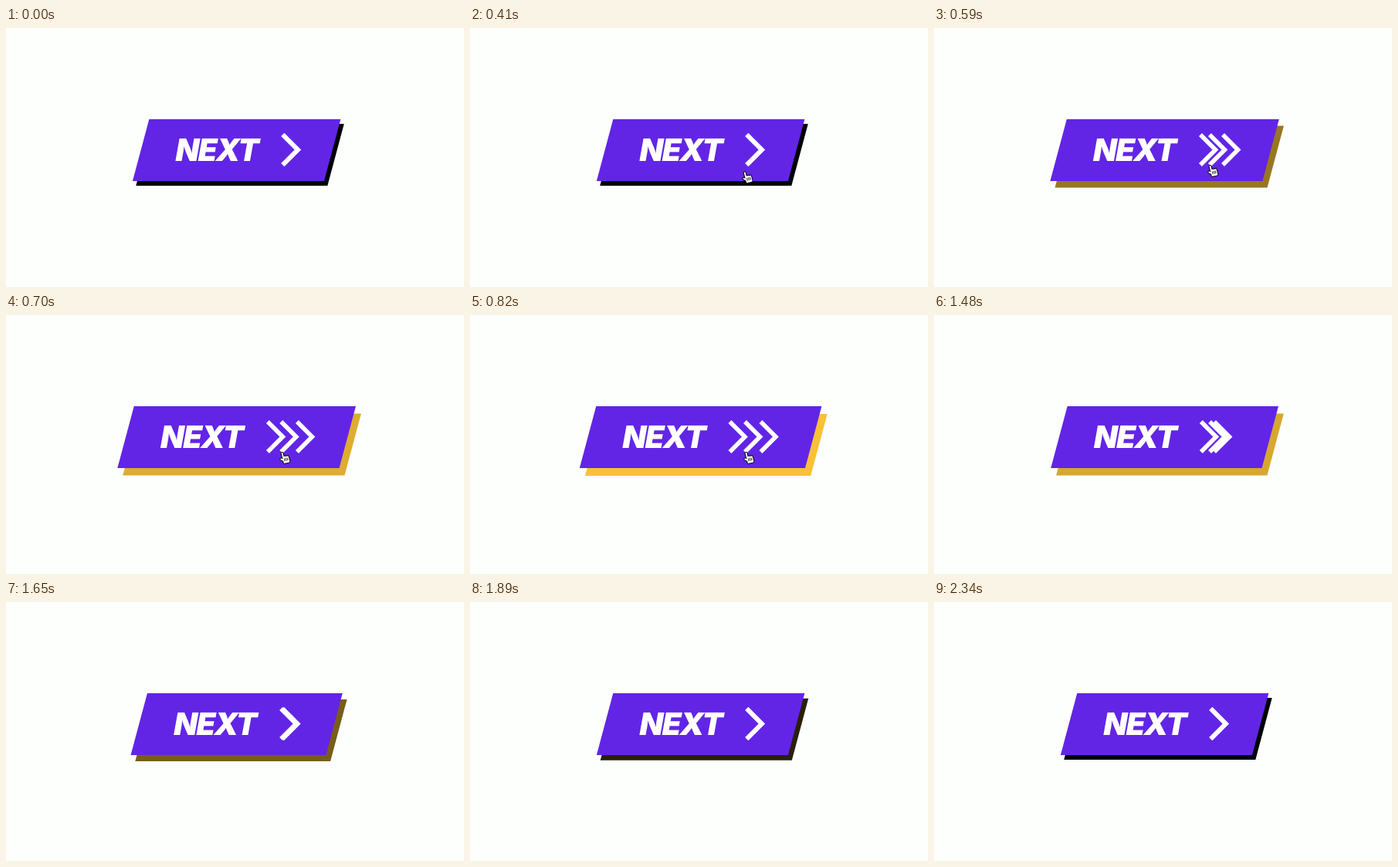
An HTML page with a canvas that plays this animation: 593 px wide and 335 px high, repeating every 2400 ms.

```html
<!DOCTYPE html>
<html lang="en">
<head>
<meta charset="utf-8">
<title>Next button</title>
<style>
html, body { margin: 0; width: 100%; height: 100%; overflow: hidden; background: #fdfffc; }
canvas { display: block; }
</style>
</head>
<body>
<canvas id="stage" width="593" height="335"></canvas>
<script>
const ctx = document.getElementById('stage').getContext('2d');
const LOOP = 2400, FIRST_TICK = 290, TICK = 58.4;
const ENTER = 409, LEAVE = 1326;
const POINTER_IN = 290, POINTER_AWAY = 1165, POINTER_OUT = 1440;
const SKEW = Math.tan(15 * Math.PI / 180), ITALIC = 0.18;
const YELLOW = [254, 197, 56];
const CENTER_X = 298.6, TOP = 118, HEIGHT = 80;

const clamp = x => Math.min(1, Math.max(0, x));

// The CSS "ease" curve, solved by bisection
function ease(x) {
  if (x <= 0 || x >= 1) return clamp(x);
  const bezier = (u, a, b) => 3 * u * (1 - u) * ((1 - u) * a + u * b) + u ** 3;
  let low = 0, high = 1;
  for (let i = 0; i < 24; i++) {
    const mid = (low + high) / 2;
    if (bezier(mid, .25, .25) < x) low = mid; else high = mid;
  }
  return bezier(low, .1, 1);
}

function hover(t, inMs, outMs = inMs) {
  return t < LEAVE ? ease((t - ENTER) / inMs) : 1 - ease((t - LEAVE) / outMs);
}

function hold(t) {
  return t < FIRST_TICK ? 0 : FIRST_TICK + Math.floor((t - FIRST_TICK) / TICK) * TICK;
}

function slab(width, offset, color) {
  ctx.save();
  ctx.translate(CENTER_X + offset, TOP + HEIGHT / 2 + offset);
  ctx.transform(1, 0, -SKEW, 1, 0, 0);
  ctx.translate(-offset * 0, 0);
  ctx.fillStyle = color;
  ctx.fillRect(-width / 2 - offset * SKEW, -HEIGHT / 2, width, HEIGHT);
  ctx.restore();
}

function label(x, y) {
  ctx.save();
  ctx.transform(1, 0, -ITALIC, 1, x, y);
  ctx.font = '900 40px Inter, sans-serif';
  ctx.letterSpacing = '-1.5px';
  ctx.fillStyle = '#fff';
  ctx.fillText('NEXT', 0, 0);
  ctx.restore();
}

function line(x1, y1, x2, y2) {
  ctx.moveTo(x1, y1);
  ctx.lineTo(x2, y2);
}

function chevron(x, y) {
  const reach = 19.5;
  ctx.beginPath();
  line(x - reach, y - reach, x, y);
  ctx.lineTo(x - reach, y + reach);
  ctx.lineWidth = 5.6;
  ctx.lineCap = 'butt';
  ctx.lineJoin = 'miter';
  ctx.strokeStyle = '#fff';
  ctx.stroke();
}

function outline(color, width) {
  ctx.strokeStyle = color;
  ctx.lineWidth = width;
  ctx.stroke();
}

function arrow() {
  ctx.beginPath();
  line(0, 0, 0, 15);
  ctx.lineTo(11, 11);
  ctx.closePath();
  line(4, 10, 7, 16);
  outline('#fff', 3);
  outline('#000', 1.5);
  ctx.fill();
}

function hand() {
  ctx.rotate(-.25);
  ctx.translate(0, 1.9);
  ctx.beginPath();
  line(0, 0, 0, 9);
  line(-3, 7, 0, 10);
  for (const x of [2, 4, 6]) line(x, 5 + x / 6, x, 10);
  ctx.rect(0, 8, 6, 4.5);
  outline('#000', 3.8);
  ctx.fillStyle = '#fff';
  ctx.fill();
  outline('#fff', 1.9);
  ctx.beginPath();
  for (const x of [1, 3, 5]) line(x, 7.5, x, 10.5);
  outline('#000', .8);
}

function pointer(t) {
  if (t < POINTER_IN || t >= POINTER_OUT) return;
  const remaining = 1 - clamp((t - POINTER_IN) / 180);
  const away = clamp((t - POINTER_AWAY) / 235);
  const y = 177 + 68 * remaining ** 2 + 82 * away ** 2.2;
  ctx.save();
  ctx.translate(357 - 5 * remaining + 3 * away, y);
  ctx.lineCap = ctx.lineJoin = 'round';
  ctx.fillStyle = '#000';
  if (y > TOP + HEIGHT) arrow(); else hand();
  ctx.restore();
}

function draw(t) {
  const open = hover(t, 500);
  const glow = hover(t, 500, 1000);
  const slide = 22.5 * open;
  const width = 248 + 45 * open;

  ctx.fillStyle = '#fdfffc';
  ctx.fillRect(0, 0, 593, 335);
  slab(width, 6 + 4 * glow, `rgb(${YELLOW.map(c => Math.round(c * glow))})`);
  slab(width, 0, '#6225e6');
  label(217.5 - slide, 172);
  for (const offset of [0, 20 * open, 40 * hover(t, 400)]) {
    chevron(377.9 - slide + offset, 157.6);
  }
  pointer(t);
}

function frame() {
  draw(hold(performance.now() % LOOP));
  requestAnimationFrame(frame);
}
frame();
</script>
</body>
</html>
```
